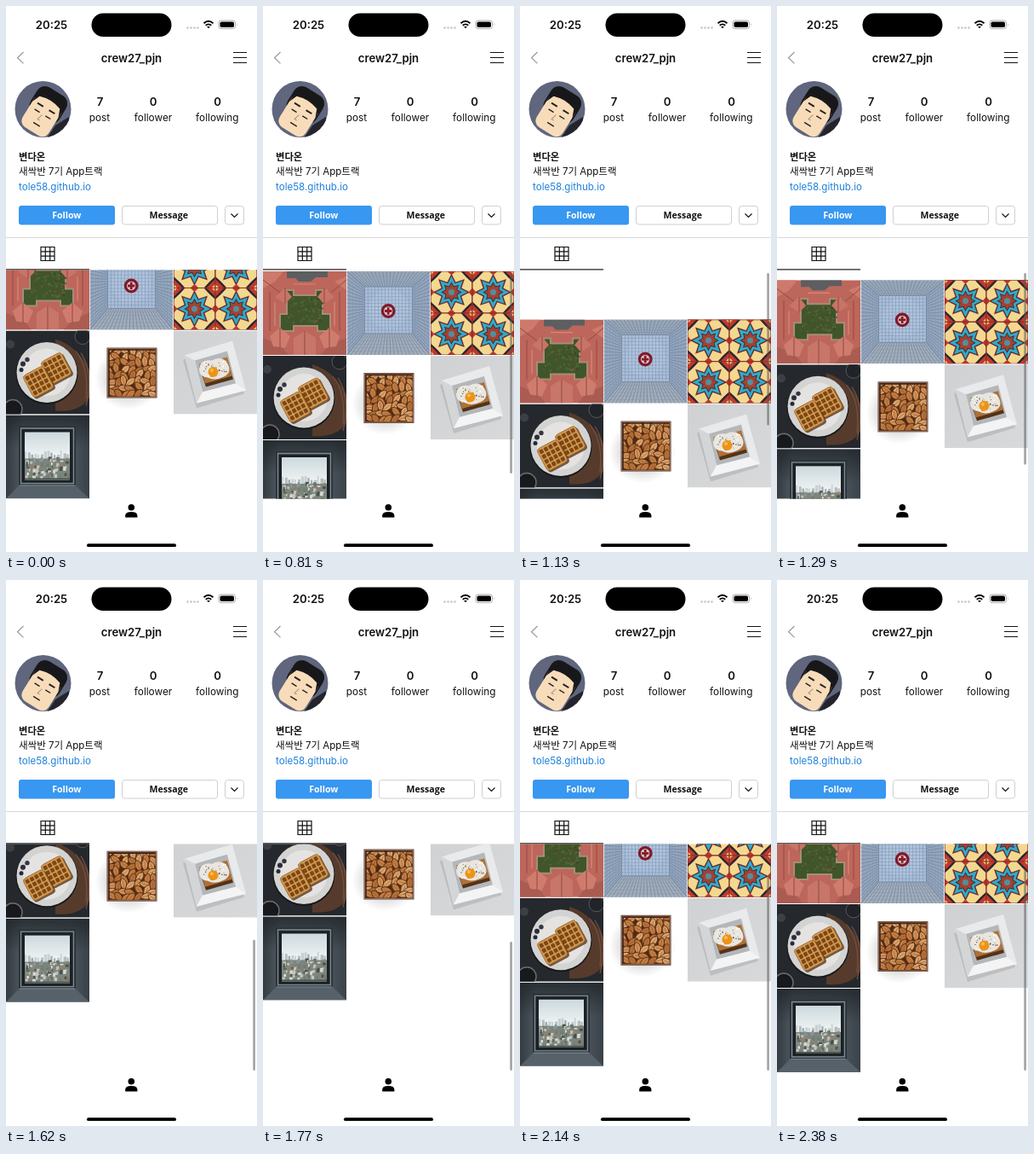
Recreate the animation shown at these times as an HTML page. Size 295 by 640 pixels, loop 2900 ms.

```html
<!DOCTYPE html>
<html lang="ko">
<head>
<meta charset="utf-8">
<title>Profile grid</title>
<style>
html, body { margin: 0; width: 100%; height: 100%; overflow: hidden; background: #fff; }
svg { display: block; width: 100vw; height: 100vh; }
text { font-family: Inter, 'Noto Sans CJK KR', 'Noto Sans CJK', sans-serif; font-size: 11.8px; fill: #111; }
.mid { text-anchor: middle; }
.semi { font-weight: 600; }
.big { font-size: 13.2px; }
.btn { font: 700 10.6px 'Open Sans', sans-serif; }
.line { fill: none; stroke: #111; stroke-width: 1.2; }
</style>
</head>
<body>
<svg viewBox="0 0 295 640">
  <defs>
    <clipPath id="view"><rect y="309.5" width="295" height="268"/></clipPath>
    <clipPath id="tile"><rect width="98" height="98"/></clipPath>
    <clipPath id="face"><circle cx="43.5" cy="121" r="33"/></clipPath>
    <clipPath id="box"><rect x="22" y="22" width="55" height="55"/></clipPath>
    <linearGradient id="sky" x2="0" y2="1"><stop stop-color="#ccd9de"/><stop offset=".5" stop-color="#eef2f2"/></linearGradient>
    <linearGradient id="table" x2="1" y2="1"><stop stop-color="#d0d1d3"/><stop offset="1" stop-color="#d8d9db"/></linearGradient>
    <linearGradient id="wall"><stop stop-color="#343b41"/><stop offset=".2" stop-color="#4f5a61"/><stop offset=".8" stop-color="#4a545b"/><stop offset="1" stop-color="#3a4248"/></linearGradient>
    <linearGradient id="dusk" x2="0" y2="1"><stop stop-color="#1d2226" stop-opacity=".75"/><stop offset=".4" stop-color="#1d2226" stop-opacity="0"/></linearGradient>
    <radialGradient id="shade"><stop offset=".5" stop-color="#bbb"/><stop offset="1" stop-color="#fff"/></radialGradient>
  </defs>

  <!-- Status bar -->
  <text x="53.5" y="26.5" class="mid semi big">20:25</text>
  <rect x="100.5" y="8.5" width="94" height="27.5" rx="13.75"/>
  <path d="M213.5 25.5h13" stroke="#c4c4c4" stroke-width="2.6" stroke-linecap="round" stroke-dasharray="0 4"/>
  <g fill="none" stroke="#000" stroke-width="1.8">
    <path d="M232.5 20.2q5.5-4.8 11 0M234.7 22.8q3.3-2.8 6.6 0"/>
    <path d="M236.6 24.3h2.8L238 26z" fill="#000" stroke-width=".6"/>
  </g>
  <rect x="250" y="17" width="19.5" height="9.6" rx="3" fill="none" stroke="#aaa"/>
  <rect x="251.5" y="18.5" width="16.5" height="6.6" rx="1.8"/>
  <path d="M271 20.2q1.6 1.6 0 3.2z" fill="#aaa"/>

  <!-- Title row -->
  <path class="line" d="M20.5 54l-7 6.7 7 6.7" style="stroke:#999"/>
  <text x="147.5" y="65.5" class="mid semi big">crew27_pjn</text>
  <path class="line" d="M267 54.5H283M267 60.5H283M267 66.5H283"/>

  <!-- Avatar -->
  <g clip-path="url(#face)">
    <rect x="10" y="87" width="67" height="68" fill="#5f667d"/>
    <path d="M48 155l10-15 16-10v25z" fill="#24252c"/>
    <g transform="translate(44 125) rotate(32)">
      <rect x="-20" y="-29" width="40" height="36" rx="11" fill="#18181a"/>
      <rect x="-18" y="-18" width="36" height="44" rx="9" fill="#f8dcba"/>
      <path d="M-18-4V-17Q0-25 18-17V-4L14-14Q0-19-14-14z" fill="#18181a"/>
      <path d="M-12-6h8M4-6h8" stroke="#222" stroke-width="2"/>
      <path d="M-11 2h7M4 2h7M-4 16h9" stroke="#222" stroke-width="1.4"/>
      <path d="M0 3l-2 7h3" fill="none" stroke="#b28f78"/>
    </g>
  </g>

  <!-- Counters and bio -->
  <g class="mid semi">
    <text x="110.5" y="117" class="big">7</text>
    <text x="173" y="117" class="big">0</text>
    <text x="248.5" y="117" class="big">0</text>
  </g>
  <g class="mid">
    <text x="110" y="135">post</text>
    <text x="173" y="135">follower</text>
    <text x="248.3" y="135">following</text>
  </g>
  <text x="15" y="180.5" font-weight="700" style="font-size:11.3px">변다온</text>
  <text x="15" y="198" style="font-size:11.5px">새싹반 7기 App트랙</text>
  <text x="15" y="215.5" style="font-size:11.6px;fill:#1f80dc">tole58.github.io</text>

  <!-- Buttons -->
  <rect x="15" y="234" width="113" height="22.5" rx="3" fill="#3897f0"/>
  <g fill="none" stroke="#cfcfcf">
    <rect x="136.5" y="234.5" width="112" height="21.5" rx="3"/>
    <rect x="257.5" y="234.5" width="22" height="21.5" rx="3"/>
  </g>
  <text x="71.3" y="249" class="mid btn" style="fill:#fff">Follow</text>
  <text x="191.3" y="249" class="mid btn">Message</text>
  <path class="line" d="M264.5 243.5l4 4 4-4"/>

  <!-- Tabs -->
  <path d="M0 271.5H295" stroke="#d9d9d9"/>
  <path class="line" d="M41 282.5H57V298.5H41zM46.3 282.5V298.5M51.7 282.5V298.5M41 287.8H57M41 293.2H57"/>
  <path d="M0 308.8H98" stroke="#222" stroke-width="1.2"/>

  <g clip-path="url(#view)"><g id="grid"></g></g>
  <rect id="thumb" x="290.3" width="2.6" rx="1.3" fill="#555" fill-opacity=".55"/>

  <!-- Bottom bar -->
  <circle cx="147.3" cy="587.8" r="3.8"/>
  <path d="M140.2 599.5v-2.2q0-4.3 7.1-4.3t7.1 4.3v2.2z"/>
  <rect x="95" y="630.3" width="105" height="3.7" rx="1.85"/>
</svg>
<script>
const $ = id => document.getElementById(id);
let seed = 7;
const rnd = (a, b) => a + (b - a) * ((seed = seed * 16807 % 2147483647) / 2147483647);
const pick = list => list[Math.floor(rnd(0, list.length))];
const repeat = (n, fn) => Array.from({ length: n }, (_, i) => fn(i)).join('');
const rect = (x, y, w, h, fill, more = '') => `<rect x="${x}" y="${y}" width="${w}" height="${h}" fill="${fill}" ${more}/>`;
const disc = (x, y, r, fill, more = '') => `<circle cx="${x}" cy="${y}" r="${r}" fill="${fill}" ${more}/>`;
const shape = (d, fill, more = '') => `<path d="${d}" fill="${fill}" ${more}/>`;
const lines = (d, stroke, w = 1) => `<path d="${d}" fill="none" stroke="${stroke}" stroke-width="${w}"/>`;

function courtyard() {
  const lawn = 'M24 22H36V28H62V22H75V34H70V50H79V70H64V64H36V70H20V50H28V34H24z';
  return rect(0, 0, 98, 98, '#bd665b')
    + shape('M28 0H76V7H62L56 12H42L38 8H28z', '#5d5e60')
    + shape('M0 0H24L14 12 0 20zM98 6L84 12 98 22z', '#cd7a6c')
    + shape('M0 98V78L20 86 30 98zM98 98V78L78 86 68 98z', '#ab5c52')
    + shape('M36 98V78L49 70 62 78V98z', '#c8766a')
    + shape(lawn, '#41552b', 'stroke="#a58d78" stroke-width="2"')
    + repeat(110, () => disc(rnd(28, 70), rnd(31, 61), rnd(.5, 1.8), pick(['#4f6833', '#33492a', '#5b6c38', '#5c4d30']), 'opacity=".7"'))
    + shape('M8 76L20 66 32 76 26 90 12 88zM90 76L78 66 66 76 72 90 86 88z', '#cf7c6e')
    + shape('M14 30L26 20 34 30 26 38zM84 30L72 20 64 30 72 38z', '#c87466')
    + lines('M0 10L20 25M98 10L80 25M8 24V70M90 24V70M20 66V90M78 66V90M49 70V98M26 20V38M72 20V38', '#94493f')
    + lines('M14 36V64M84 36V64M36 15H62', '#d8897a', 1.2);
}

function blueRoom() {
  const rays = repeat(22, i => {
    const k = i / 21, out = 98 * k, near = 21 + 56 * k, side = 18 + 55 * k;
    return `M${out} 0L${near} 18M${out} 98L${near} 73M0 ${out}L21 ${side}M98 ${out}L77 ${side}`;
  });
  const rings = repeat(5, i => {
    const k = (i + 1) / 6;
    return `M${21 * k} ${18 * k}H${98 - 21 * k}V${98 - 25 * k}H${21 * k}z`;
  });
  const mesh = repeat(15, i => `M${21 + i * 4} 18V73M21 ${18 + i * 3.93}H77`);
  return rect(0, 0, 98, 98, '#95a7bf')
    + shape('M0 0H98L77 18H21z', '#9ba9b9') + shape('M0 98H98L77 73H21z', '#a3aebb')
    + rect(21, 18, 56, 55, '#a9bdd7') + disc(49, 44, 23, '#b6c9df', 'opacity=".6"')
    + lines(rays, '#6d8099', .7) + lines(rings, '#8194ac', .5) + lines(mesh, '#8199b8', .6)
    + lines('M21 18H77V73H21z', '#7388a3', .8)
    + disc(48.7, 46.5, 6.8, '#d8cbd2', 'stroke="#7e1a28" stroke-width="3.2"')
    + lines('M48.7 42.3v8.4M44.5 46.5h8.4', '#8a1b2a', 2.8);
}

function starTiles() {
  const star = (R, r, fill) => shape('M' + Array.from({ length: 16 }, (_, i) => {
    const a = i * Math.PI / 8, q = i % 2 ? r : R;
    return `${(q * Math.sin(a)).toFixed(1)} ${(-q * Math.cos(a)).toFixed(1)}`;
  }).join('L') + 'z', fill);
  const corner = repeat(4, i => `<g transform="rotate(${i * 90})">`
    + shape('M24.5 24.5H11L17 18 18 17 24.5 11z', '#292530')
    + shape('M24.5 24.5H14L24.5 14z', '#c23a2e')
    + shape('M24.5 24.5H20L24.5 20z', '#f2cf78')
    + shape('M24.5-5L20 0 24.5 5z', '#b5372f') + '</g>');
  const cell = rect(-24.5, -24.5, 49, 49, '#f3d88f') + corner
    + star(22, 13, '#b03a2c') + star(20.5, 12, '#24283a') + star(19, 11, '#37a8c4')
    + star(12, 7.5, '#272937') + star(10.5, 6.5, '#a8402f') + disc(0, 0, 3.5, '#4f90a0')
    + lines('M-24.5-24.5H24.5V24.5H-24.5z', '#8e2f2b', 1.2);
  return repeat(4, i => `<g transform="translate(${24.5 + i % 2 * 49} ${24.5 + (i >> 1) * 49})">${cell}</g>`);
}

function waffles() {
  const waffle = (x, y) => `<g transform="translate(${x} ${y}) rotate(-28)">`
    + rect(-13, -12, 28, 29, '#4d2b10', 'rx="4" opacity=".75"')
    + rect(-13.5, -14.5, 27, 29, '#d39a4e', 'rx="4" stroke="#9a6127" stroke-width=".8"')
    + repeat(16, i => rect(-11.5 + i % 4 * 6, -12.3 + (i >> 2) * 6.5, 4.6, 5, '#7c4717', 'rx="1"')) + '</g>';
  return rect(0, 0, 98, 98, '#25282c')
    + shape('M58 10Q84 18 98 46V78Q88 96 58 94z', '#563b2c')
    + lines('M82 24Q98 44 94 80M88 26Q104 50 94 88', '#745040', 1.2)
    + disc(8, 92, 11, '#17191c', 'stroke="#6a6d70" stroke-width="1.5"')
    + disc(90, 7, 9, '#202327', 'stroke="#565a5e"') + disc(5, 16, 5, '#3c4045')
    + disc(48, 50, 36.5, '#17181a') + disc(48, 49, 35.5, '#d3d3d2') + disc(48, 49, 28, '#e4e3e1')
    + waffle(59, 44) + waffle(38, 60)
    + disc(20, 39, 3, '#2b2d3b') + disc(25, 34, 2.7, '#343647') + disc(18, 46, 2.5, '#262837');
}

function almonds() {
  const nuts = repeat(56, i => `<g transform="translate(${24 + i % 7 * 8.4 + rnd(-2, 2)} ${24 + Math.floor(i / 7) * 7.2 + rnd(-2, 2)}) rotate(${rnd(0, 180)})">`
    + shape('M-7.5 0Q-2-7.5 7.5 0-2 7.5-7.5 0z', pick(['#c37d42', '#d3945a', '#b56e38', '#dba46b']), 'stroke="#532c14" stroke-width=".8"')
    + lines('M-4 0H5', '#9a5c30', .6) + '</g>');
  return rect(0, 0, 98, 98, '#fff')
    + `<ellipse cx="45" cy="56" rx="39" ry="37" fill="url(#shade)" opacity=".6"/>`
    + rect(20, 20, 59, 59, '#633f2f') + rect(22, 22, 55, 55, '#4f2b14')
    + `<g clip-path="url(#box)">${nuts}</g>`
    + lines('M21 21H78V78H21z', '#a18170', .7) + lines('M22.5 77V22.5H77', '#3c241a', 1.6);
}

function egg() {
  return rect(0, 0, 98, 98, 'url(#table)')
    + shape('M11 34L67 18 83 74 27 91z', '#a6a8aa', 'opacity=".5"')
    + shape('M13 29L69 12 85 70 27 85z', '#e9eaeb')
    + shape('M25 35L63 24 73 62 34 72z', '#b4b7ba')
    + shape('M13 29L25 35 34 72 27 85z', '#d3d5d7') + shape('M27 85L34 72 73 62 85 70z', '#f4f4f4')
    + shape('M30 42L63 33 70 57 38 66z', '#543319') + shape('M30 39L63 31 69 53 37 62z', '#ad7139')
    + shape('M30 45Q31 33 45 35 57 29 63 38 69 47 61 53 49 60 40 55 30 54 30 45z', '#e9e6df')
    + repeat(46, () => disc(rnd(34, 63), rnd(36, 54), rnd(.4, 1), pick(['#5b5149', '#8f867c', '#fff', '#77614b'])))
    + disc(46.5, 48.5, 6, '#ec9418') + disc(45, 46.5, 2, '#f8bf4b');
}

function cityWindow() {
  const city = repeat(100, i => {
    const y = 50 + i / 100 * 24, h = rnd(1.5, 5);
    return rect(rnd(22, 72), y - h / 2, rnd(1.5, 4), h, pick(['#87928e', '#c3c5bf', '#56655a', '#dddbd3', '#6f7b77', '#94806e', '#45534a']));
  });
  return rect(0, 0, 98, 98, 'url(#wall)') + rect(0, 0, 98, 98, 'url(#dusk)')
    + shape('M0 98L17 81H80L98 98z', '#56616a')
    + rect(15, 13, 67, 69, '#2a3136') + lines('M17.5 15.5H79.5V80H17.5z', '#7f8c93', 1.3)
    + rect(19, 17, 59, 62, '#1c2125') + rect(22, 20, 53, 56, 'url(#sky)')
    + repeat(14, i => rect(22 + i * 3.8, rnd(40, 47), rnd(1.5, 3.6), 12, pick(['#b3bec2', '#c8d0d2', '#9da9ad'])))
    + rect(22, 51, 53, 25, '#7a857e') + city + rect(22, 74, 53, 2, '#4c5750')
    + lines('M16 82.5H81', '#78858c', 1.2);
}

$('grid').innerHTML = [courtyard, blueRoom, starTiles, waffles, almonds, egg, cityWindow]
  .map((draw, i) => `<g transform="translate(${i % 3 * 98.5} ${Math.floor(i / 3) * 99})" clip-path="url(#tile)">${draw()}</g>`)
  .join('');

const LOOP = 2900, TOP = 310, END = -28.5;
const steps = [0, 810, 910, 990, 1060, 1140, 1210, 1290, 1470, 1550, 1620, 1700, 1780, 1850, 1930,
  2000, 2080, 2150, 2230, 2300, 2380];

// Critically damped spring back from an overscroll
const bounce = (size, t) => size * (1 + .0109 * t) * Math.exp(-.0109 * t);

function scrollAt(t) {
  if (t < 810) return END;
  if (t < 990) return 70 - 69 * ((990 - t) / 180) ** 1.5;
  if (t < 1470) return bounce(70, t - 990);
  if (t < 1712) return END - 85 + 102 * ((1712 - t) / 242) ** 4;
  return END - bounce(85, t - 1712);
}

function frame() {
  const now = performance.now() % LOOP;
  const t = steps.findLast(s => s <= now);
  const y = scrollAt(t);
  const size = 236 - Math.max(0, y, END - y);
  const along = Math.min(1, Math.max(0, y / END));
  $('grid').setAttribute('transform', `translate(0 ${TOP + y})`);
  $('thumb').setAttribute('y', y < END ? 575 - size : 313 + 26 * along);
  $('thumb').setAttribute('height', size);
  $('thumb').setAttribute('visibility', t ? 'visible' : 'hidden');
  requestAnimationFrame(frame);
}
frame();
</script>
</body>
</html>
```
